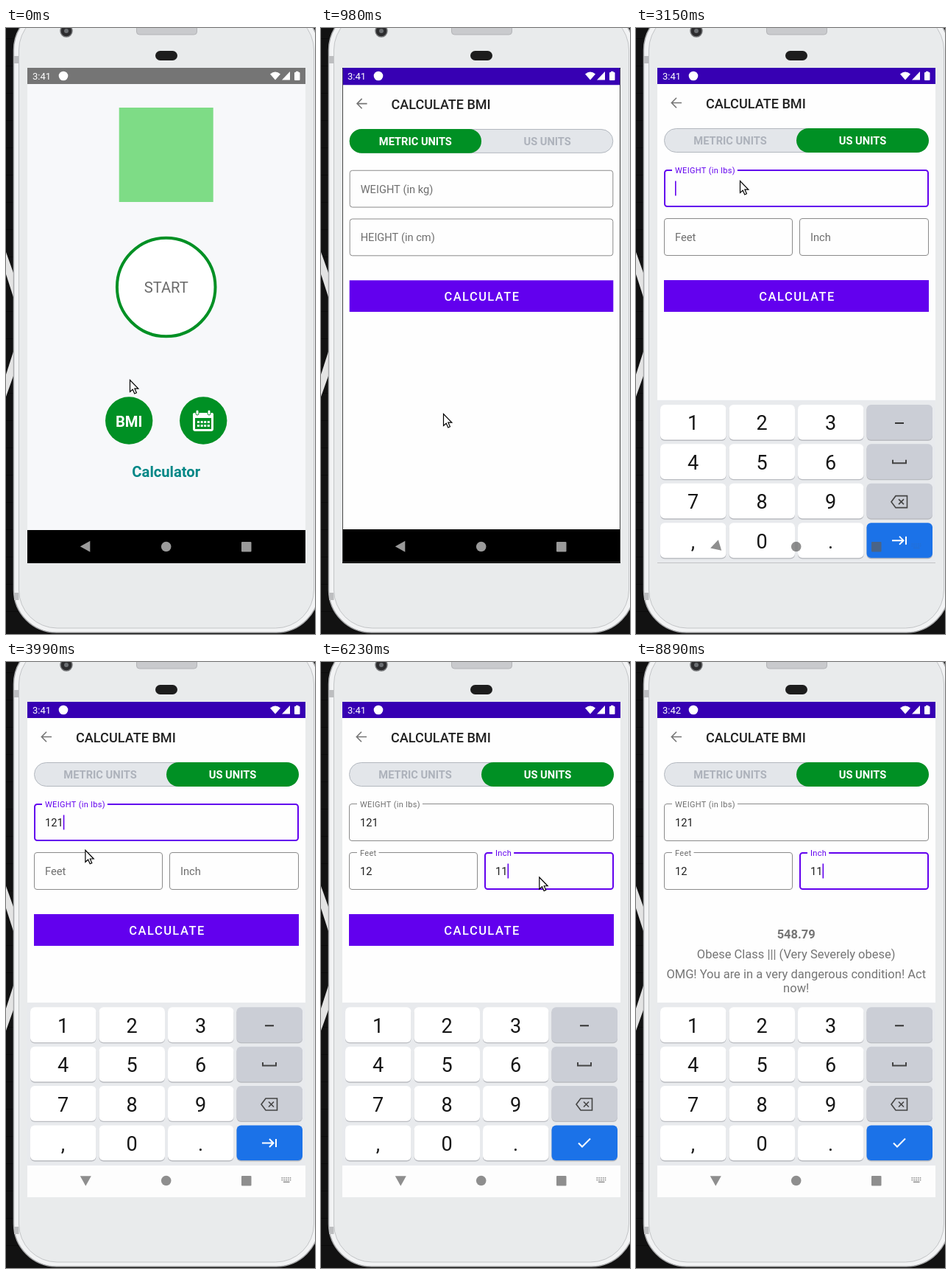
An HTML page with a canvas for the animation above (8960 ms loop, 420 px wide and 822 px high).

```html
<!DOCTYPE html>
<html lang="en">
<head>
<meta charset="utf-8">
<title>BMI calculator demo</title>
<style>
html, body { margin: 0; width: 100%; height: 100%; overflow: hidden; background: #121212; }
canvas { display: block; width: 420px; height: 822px; }
</style>
</head>
<body>
<canvas id="stage" width="420" height="822"></canvas>
<script>
const c = document.getElementById('stage').getContext('2d');
const LOOP = 8960, STEP = 70, BLINK = 507;
const GREEN = '#009024', PURPLE = '#6200ee', GRAY = '#757575';
const MID = 217.7;

const clamp = v => Math.max(0, Math.min(1, v));
const span = (t, from, to) => clamp((t - from) / (to - from));
const smooth = v => v * v * (3 - 2 * v);
const easeOut = (v, power) => 1 - (1 - v) ** power;

function box(x, y, w, h, r, fill, stroke, lw = 1) {
  c.beginPath();
  c.roundRect(x, y, w, h, r);
  if (fill) { c.fillStyle = fill; c.fill(); }
  if (stroke) { c.strokeStyle = stroke; c.lineWidth = lw; c.stroke(); }
}
function disc(x, y, r, fill, stroke, lw) {
  box(x - r, y - r, 2 * r, 2 * r, r, fill, stroke, lw);
}
// Draws an SVG path around the point x, y.
function icon(d, x, y, stroke, lw = 1.6, fill) {
  const shape = new Path2D(d);
  c.save();
  c.translate(x, y);
  if (fill) { c.fillStyle = fill; c.fill(shape); }
  if (stroke) { c.strokeStyle = stroke; c.lineWidth = lw; c.stroke(shape); }
  c.restore();
}
function text(s, x, y, size, color, weight = 400, align = 'left', gap = 0) {
  c.font = `${weight} ${size}px Roboto, sans-serif`;
  c.letterSpacing = gap + 'px';
  c.textAlign = align;
  c.fillStyle = color;
  c.fillText(s, x, y);
}
const centered = (s, x, y, size, color, weight, gap) =>
  text(s, x, y, size, color, weight, 'center', gap);

function phone() {
  box(0, 0, 420, 822, 0, '#121212');
  for (let y = 14; y < 822; y += 37) box(0, y, 420, 1, 0, '#0b0b0b');
  for (const s of [-1, 1])
    icon(`M0 ${s * 98} L10 ${s * 70} V${s * 37} L0 ${s * 68}`, 0, 402, null, 0, '#e4e4e4');
  box(10.5, -28, 415, 848, 58, '#f2f3f4', '#a9aaac', 1.5);
  for (const y of [38, 766]) box(11, y, 6.5, 10, 0, '#bdbec0');
  box(17.5, -22, 401, 836, 52, '#e9ebec', '#c3c5c7');
  disc(82, 4, 8, '#2c2c2e', '#77797b', 1.5);
  disc(82, 4, 3, '#6b6e72');
  box(177.5, -4, 82, 13, 4, '#c9cacd', '#b3b4b7');
  box(203, 31, 30, 13, 6.5, '#1d1d1d');
}

function status(t) {
  text(t < 6300 ? '3:41' : '3:42', 36, 70, 13, '#fff');
  disc(78, 65, 6.3, '#fff');
  icon('M0 11 L-7 3 Q0 -3 7 3 Z', 366, 59.5, null, 0, '#fff');
  icon('M0 0 H11 V-11.5 Z', 375, 70.5, null, 0, '#fff');
  box(392, 60, 7.5, 11, 1, '#fff');
  box(394, 58.8, 3.5, 2, 0, '#fff');
}

function home() {
  box(29, 54, 378, 672, 0, '#f7f8fa');
  box(29, 54, 378, 22, 0, GRAY);
  box(MID - 64, 108, 128, 128, 0, '#7edc86');
  disc(MID, 351.5, 66.8, '#fff', GREEN, 4);
  centered('START', MID, 359, 20.2, '#6b6b6b');
  disc(167.2, 532.5, 32.2, GREEN);
  centered('BMI', 167.2, 540.5, 20.2, '#fff', 700);
  disc(268.2, 532.5, 32.2, GREEN);
  box(255.5, 523.5, 25, 22, 2, null, '#fff', 3);
  box(254, 522, 28, 7, 2, '#fff');
  for (const x of [260, 276]) box(x - 2, 518, 4, 7, 2, '#fff', GREEN);
  for (let i = 0; i < 8; i++)
    box(260 + i % 4 * 4.6, 533 + (i >> 2) * 5, 3, 3, 0, '#fff');
  centered('Calculator', MID, 609.3, 20.2, '#018786', 700);
  box(29, 681, 378, 45, 0, '#000');
}

// Outlined input: the label floats into the border on focus, then text is
// typed from time `from`, one character every `gap` ms.
function field(t, x, y, w, label, { focus = LOOP, blur = LOOP, value = '', from, gap } = {}) {
  const active = t > focus && t <= blur;
  const up = smooth(span(t, focus, focus + 167));
  const lw = active ? 2 : 1;
  box(x + lw / 2, y + lw / 2, w - lw, 51 - lw, 3.5, null, active ? PURPLE : '#8a8a8a', lw);
  if (t > focus) {
    c.font = '400 11px Roboto, sans-serif';
    c.letterSpacing = '.32px';
    box(x + 11, y - 1, c.measureText(label).width + 7, 4, 0, '#fff');
  }
  text(label, x + 15, y + 31 - 26 * up, 14.7 - 3.7 * up, active ? PURPLE : '#6e6e6e',
    400, 'left', .32 * up);
  if (t <= focus) return;

  const count = t < from ? 0 : Math.min(value.length, 1 + Math.floor((t - from) / gap));
  const touched = count ? from + (count - 1) * gap : focus;
  const shown = value.slice(0, count);
  text(shown, x + 15, y + 31, 14.7, '#202020');
  if (active && (t - touched) % (2 * BLINK) < BLINK)
    box(x + 15 + c.measureText(shown).width, y + 15.5, 1.6, 20, 0, PURPLE);
}

function form(t) {
  const us = t >= 1820;
  box(29, 54, 378, 672, 0, '#fefefe');
  box(29, 44, 378, 32, 0, '#3700b3');
  icon('M7 0 H-6 M0 -6.7 L-6.6 0 L0 6.7', 55, 101.5, GRAY);
  text('CALCULATE BMI', 95, 108.5, 18.1, '#212121', 500);

  box(38.5, 136.5, 359, 32, 16, '#e3e6ea', '#b2b7be');
  box(us ? 218 : 38, 136, 180, 33, 16.5, GREEN);
  ['METRIC UNITS', 'US UNITS'].forEach((s, i) =>
    centered(s, 128 + 180 * i, 158.2, 14.7, us == i ? '#fff' : '#adb2bb', 700));

  if (us) {
    field(t, 38, 192, 360, 'WEIGHT (in lbs)',
      { focus: 2800, blur: 4200, value: '121', from: 3430, gap: 70 });
    field(t, 38, 258, 175, 'Feet',
      { focus: 4200, blur: 5110, value: '12', from: 4620, gap: 70 });
    field(t, 222, 258, 176, 'Inch',
      { focus: 5110, value: '11', from: 5600, gap: 210 });
  } else {
    field(t, 38, 192, 360, 'WEIGHT (in kg)');
    field(t, 38, 258, 360, 'HEIGHT (in cm)');
  }

  if (t < 7350) {
    box(38, 342, 360, 43, 0, PURPLE);
    centered('CALCULATE', 219, 370, 16.5, '#fff', 500, 1.47);
  } else {
    centered('548.79', MID, 374.5, 16.5, GRAY, 700);
    centered('Obese Class ||| (Very Severely obese)', MID, 401.5, 16.5, GRAY);
    centered('OMG! You are in a very dangerous condition! Act', MID, 428.5, 16.5, GRAY);
    centered('now!', MID, 447.5, 16.5, GRAY);
  }
  box(29, 681, 378, 45, 0, '#000');
}

function keyboard(t) {
  if (t <= 2940) return;
  c.save();
  c.translate(0, 264 * (1 - easeOut(span(t, 2940, 3360), 2.63)));
  box(29, 462, 378, 221, 0, '#e8eaed');
  box(29, 683, 378, 43, 0, '#fdfdfd');
  for (let i = 0; i < 16; i++) {
    const col = i % 4, row = i >> 2;
    const x = 33 + 93.5 * col, y = 468.3 + 53.4 * row;
    const fill = i === 15 ? '#1b72e8' : col === 3 ? '#cbced6' : '#fff';
    box(x, y + 1, 89.5, 48, 6, '#b9bbc0');
    box(x, y, 89.5, 47.6, 6, fill);
    if (col < 3) centered('123 456 789 ,0.'[i], x + 44.5, y + 34.5, 27, '#161616');
  }
  const x = 358;
  icon('M-6 0 H6', x, 493.3, '#333', 2);
  icon('M-9 -2 V2.5 H9 V-2', x, 545, '#444', 2);
  icon('M-11 0 L-5 -8 H10.5 V8 H-5 Z M-1 -3.5 L6 3.5 M6 -3.5 L-1 3.5', x, 600, '#444');
  icon(t < 4270 ? 'M-10 0 H5 M0 -5.5 L5.5 0 L0 5.5 M9 -5.5 V5.5' : 'M-8 0 L-3 5 L8 -6',
    x, 652.5, '#fff', 2);
  c.restore();
}

function navButtons(t) {
  const turn = smooth(span(t, 3080, 3330));
  const color = t > 2940 ? '#5e5e5eb3' : '#9a9a9a';
  c.save();
  c.translate(108.3, 703.3);
  c.rotate(-turn * Math.PI / 2);
  icon('M-7.5 0 L6 -7.5 V7.5 Z', 0, 0, null, 0, color);
  c.restore();
  disc(MID, 703.5, 6.8, color);
  box(320, 697, 13.5, 13.5, 1, color);
  c.globalAlpha = turn;
  for (let i = 0; i < 10; i++)
    box(374.5 + i % 5 * 2.8, 699 + (i > 4) * 2.8, 1.6, 1.6, 0, color);
  box(377, 704.6, 8.5, 1.5, 0, color);
  c.globalAlpha = 1;
}

// Each pointer move: from time, to time, then where it ends.
const moves = [
  [0, 280, 166, 523], [980, 1400, 315, 136], [1470, 1680, 298, 147],
  [1890, 2520, 141, 207], [3780, 4130, 96, 271], [4550, 4970, 234, 275],
  [5670, 5950, 257, 280], [6020, 6500, 325, 300], [6500, 7140, 258, 353],
  [7980, 8610, 227, -24]
];
function pointer(t) {
  let x = 168, y = 477;
  for (const [from, to, toX, toY] of moves) {
    const p = easeOut(span(t, from, to), 1.5);
    x += (toX - x) * p;
    y += (toY - y) * p;
  }
  icon('M.5 .5 V16.5 L4.2 13.2 L6.8 19 L9.4 17.8 L6.9 12.2 H11.8 Z', x, y, '#000', 1.2, '#fff');
}

function zoom(scale, alpha, draw) {
  c.save();
  c.globalAlpha = alpha;
  c.translate(218, 390);
  c.scale(scale, scale);
  c.translate(-218, -390);
  draw();
  c.restore();
}

function render(t) {
  phone();
  c.save();
  c.beginPath();
  c.rect(29, 54, 378, 672);
  c.clip();
  const open = easeOut(span(t, 740, 1140), 4);
  box(29, 54, 378, 672, 0, '#000');
  if (t < 840) zoom(1 + .05 * open, 1, home);
  if (t > 770) zoom(.85 + .15 * open, 1, () => form(t));
  keyboard(t);
  navButtons(t);
  status(t);
  c.restore();
  pointer(t);
}

const start = performance.now();
function tick(now) {
  const t = Math.max(0, now - start) % LOOP;
  render(t - t % STEP);
  requestAnimationFrame(tick);
}
tick(start);
</script>
</body>
</html>
```
